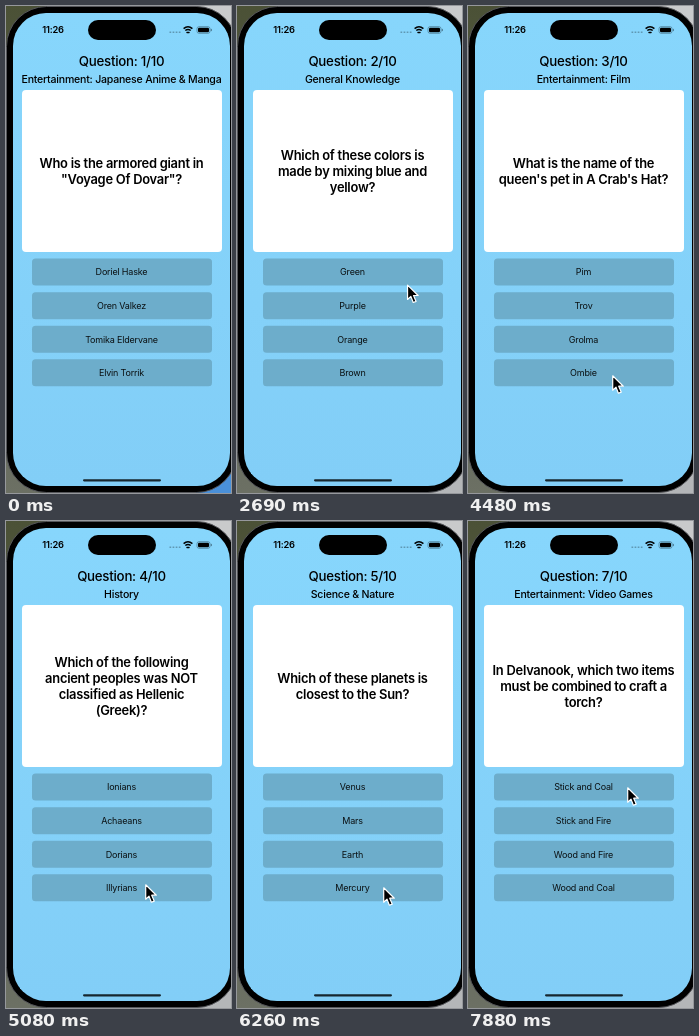
Recreate the animation shown at these times as an HTML page. Size 225 px wide and 487 px high, loop 8 s.

```html
<!DOCTYPE html>
<html lang="en">
<head>
<meta charset="utf-8">
<title>Quiz</title>
<style>
  html, body { margin: 0; width: 100%; height: 100%; overflow: hidden; background: #000; }
  svg { display: block; width: 100vw; height: 100vh; }
  text { font-family: Inter, "Liberation Sans", sans-serif; text-anchor: middle; letter-spacing: -.02em; }
  .title { font-size: 13.3px; font-weight: 500; }
  .topic { font-size: 10.55px; font-weight: 500; }
  .question { font-size: 12.9px; font-weight: 600; }
  .answer { font-size: 9px; }
  .clock { font-size: 9.3px; font-weight: 600; }
</style>
</head>
<body>
<svg viewBox="0 0 225 487" preserveAspectRatio="none">
  <defs>
    <linearGradient id="sky" x2="0" y2="1">
      <stop stop-color="#87d6fc"/><stop offset="1" stop-color="#82cef7"/>
    </linearGradient>
    <linearGradient id="desk" x2="0" y2="1">
      <stop stop-color="#4b5136"/><stop offset="1" stop-color="#6c7064"/>
    </linearGradient>
  </defs>
  <rect width="225" height="487" fill="url(#desk)"/>
  <rect x="112" width="113" height="240" fill="#c9cacb"/>
  <rect id="corner" x="112" y="440" width="113" height="47"/>
  <rect x=".5" y=".5" width="230" height="486" rx="40" fill="#000" stroke="#55565a"/>
  <rect x="7" y="7" width="217" height="473" rx="33" fill="url(#sky)"/>
  <rect x="82" y="14" width="68" height="20" rx="10"/>
  <text class="clock" x="47" y="27.3">11:26</text>
  <path d="M163.5 26.3h11" stroke="#5f98b3" stroke-width="1.6" stroke-dasharray="1.7 1.4"/>
  <g fill="none" stroke="#000" stroke-width="1.5">
    <path d="M177.6 22.6q4.4-3.8 8.8 0M179.3 24.5q2.7-2.2 5.4 0"/>
    <path d="M181 26.4h2" stroke-linecap="round"/>
  </g>
  <rect x="191" y="20.7" width="13" height="6.6" rx="2" fill="none" stroke="#47738a" stroke-width=".7"/>
  <rect x="192" y="21.7" width="11" height="4.6" rx="1.2"/>
  <path d="M205.3 22.9v2.2" stroke="#47738a"/>
  <text class="title" id="title" x="115.5" y="59.6"/>
  <text class="topic" id="topic" x="115.5" y="76.6"/>
  <rect x="16" y="84" width="200" height="162" rx="4" fill="#fff"/>
  <g id="question"></g>
  <g id="answers"></g>
  <rect x="77" y="473.2" width="78" height="2.2" rx="1.1" fill="#16262e"/>
  <path id="cursor" d="M.7.8V15.2L4 12.1 6.4 18.2 9.2 17.1 6.7 11.2H11.3Z" stroke="#fff" stroke-width="1.2" stroke-linejoin="round"/>
</svg>
<script>
const LOOP = 8000, STEP = 148.6;

// start step, number, topic, question lines, answers
const rounds = [
  [0, 1, "Entertainment: Japanese Anime & Manga",
    "Who is the armored giant in|\"Voyage Of Dovar\"?",
    "Doriel Haske|Oren Valkez|Tomika Eldervane|Elvin Torrik"],
  [14, 2, "General Knowledge",
    "Which of these colors is|made by mixing blue and|yellow?",
    "Green|Purple|Orange|Brown"],
  [23, 3, "Entertainment: Film",
    "What is the name of the|queen's pet in A Crab's Hat?",
    "Pim|Trov|Grolma|Ombie"],
  [34, 4, "History",
    "Which of the following|ancient peoples was NOT|classified as Hellenic|(Greek)?",
    "Ionians|Achaeans|Dorians|Illyrians"],
  [39, 5, "Science & Nature",
    "Which of these planets is|closest to the Sun?",
    "Venus|Mars|Earth|Mercury"],
  [44, 6, "Science: Computers",
    "What is the main CPU is the|Zuna Peko Drive / Zuna|Kaldera?",
    "Kelax K40|Ovrin 6016|Dravonta 52000|Hanoru HR3704"],
  [49, 7, "Entertainment: Video Games",
    "In Delvanook, which two items|must be combined to craft a|torch?",
    "Stick and Coal|Stick and Fire|Wood and Fire|Wood and Coal"]
].map(([start, number, topic, question, answers]) =>
  ({ start, number, topic, question: question.split("|"), answers: answers.split("|") }));

// step -> pressed answer
const presses = { 22: 0, 33: 3, 38: 1, 43: 3, 48: 2 };

// cursor waypoints: step, x, y
const route = [
  [6, 196, 401], [7, 196, 401], [12, 159, 300], [13, 158, 297], [14, 158, 302],
  [16, 158, 302], [19, 174, 270], [20, 169, 266], [24, 169, 266], [30, 144, 369],
  [32, 139, 363], [34, 139, 363], [37, 136, 298], [39, 136, 298], [42, 146, 366],
  [44, 146, 366], [47, 148, 325], [49, 148, 325], [53, 159, 266]
];

const $ = id => document.getElementById(id);
const ease = u => u * u * (3 - 2 * u);

function add(parent, tag, attrs, text = "") {
  const node = document.createElementNS("http://www.w3.org/2000/svg", tag);
  for (const key in attrs) node.setAttribute(key, attrs[key]);
  node.textContent = text;
  parent.append(node);
  return node;
}

const buttons = [0, 1, 2, 3].map(i => {
  const y = 252.6 + i * 33.55;
  return {
    box: add($("answers"), "rect", { x: 26, y, width: 180, height: 27, rx: 3.5 }),
    label: add($("answers"), "text", { class: "answer", x: 115.5, y: y + 16.8 })
  };
});

function cursorAt(step) {
  const i = route.findLastIndex(p => p[0] <= step);
  const [s, x, y] = route[i];
  const [s2, x2, y2] = route[i + 1] || [s + 1, x, y];
  const u = ease((step - s) / (s2 - s));
  return [x + (x2 - x) * u, y + (y2 - y) * u];
}

let shown;
function showRound(round) {
  if (round === shown) return;
  shown = round;
  $("title").textContent = `Question: ${round.number}/10`;
  $("topic").textContent = round.topic;
  $("question").replaceChildren();
  const top = 169.7 - (round.question.length - 1) * 8;
  round.question.forEach((line, i) =>
    add($("question"), "text", { class: "question", x: 115.5, y: top + i * 16 }, line));
  buttons.forEach((b, i) => b.label.textContent = round.answers[i]);
}

function draw(time) {
  const step = Math.floor((time % LOOP) / STEP);
  showRound(rounds.findLast(r => r.start <= step));
  buttons.forEach((b, i) => {
    const pressed = presses[step] === i;
    b.box.setAttribute("fill", pressed ? "#76bbdb" : "#6dadcb");
    b.label.setAttribute("fill", pressed ? "#35525f" : "#0a1012");
  });
  $("corner").setAttribute("fill", step < 14 ? "#4a90d9" : "#b4b6b8");
  const visible = step >= route[0][0];
  $("cursor").setAttribute("visibility", visible ? "visible" : "hidden");
  if (visible) $("cursor").setAttribute("transform", `translate(${cursorAt(step)})`);
}

const origin = performance.now();
function tick() {
  draw(performance.now() - origin);
  requestAnimationFrame(tick);
}
tick();
</script>
</body>
</html>
```
